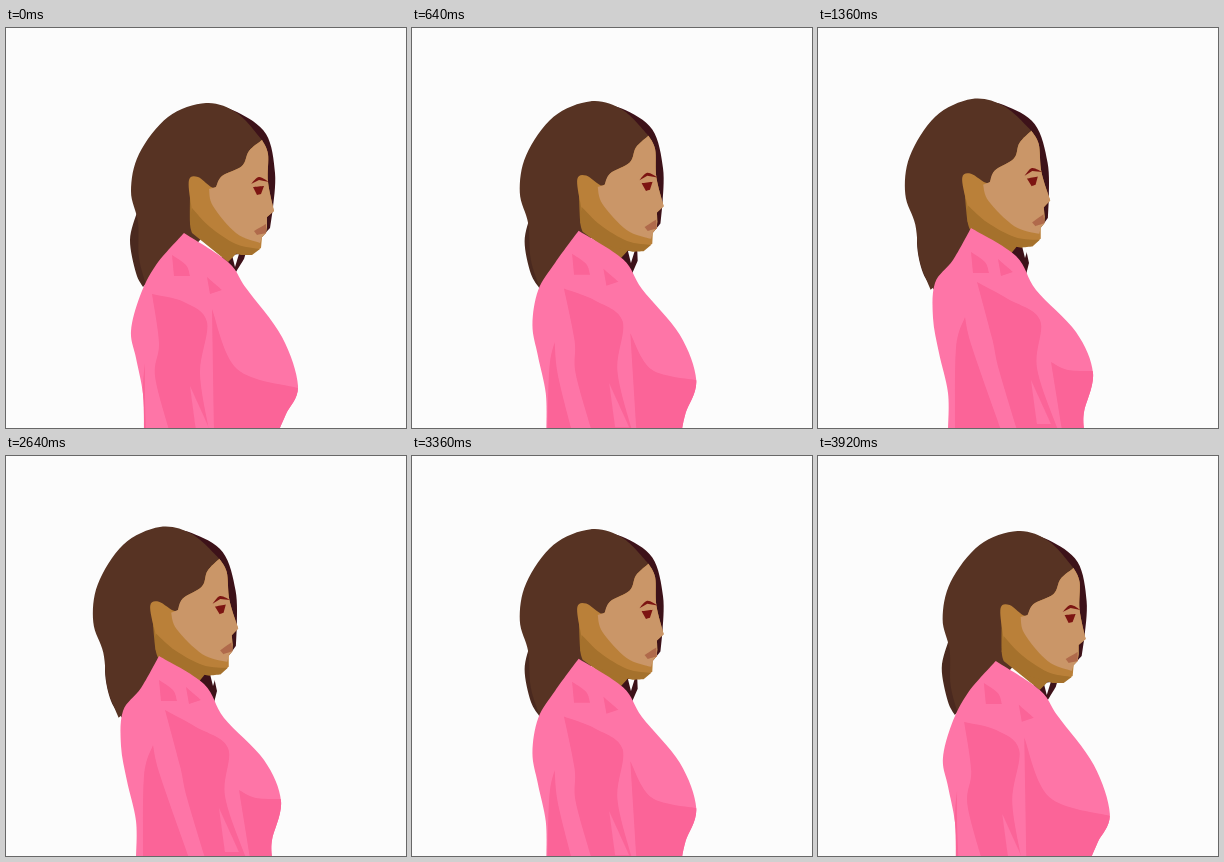
An HTML page with a canvas that plays this animation: 400x400 px, repeating every 5.92 s.

```html
<!DOCTYPE html>
<html>
<head>
<meta charset="utf-8">
<style>
html, body { margin: 0; width: 100%; height: 100%; overflow: hidden; background: #fcfcfc; }
canvas { display: block; width: 100vmin; height: 100vmin; }
</style>
</head>
<body>
<canvas width="400" height="400"></canvas>
<script>
const ctx = document.querySelector('canvas').getContext('2d');
const PAPER = '#fcfcfc', HAIR = '#573323', FAR = '#3d1219', BACK = '#4a291f';
const SKIN = '#ba8039', LIT = '#ca9668', SHADE = '#a5712c', RED = '#7c1512';
const PINK = '#fe75a7', FOLD = '#fb6498';
const LOOP = 5920, STEP = 80, TURN = 1360, BACK_AT = 2640;

// Runs of key points are split by "/": each run is a smooth curve, runs meet in corners.
const parse = s => s.split('/').map(run => run.trim().split(' ').map(p => p.split(',').map(Number)));

// A shape has two poses; the second is given by key points or by a rule for each point.
function shape(color, pose, next) {
  const a = parse(pose);
  const b = typeof next === 'string' ? parse(next) : a.map(run => run.map(next));
  return { color, at: u => outline(a.map((run, i) => run.map((p, j) =>
    p.map((v, k) => v + (b[i][j][k] - v) * u)))) };
}

function outline(runs) {
  const path = new Path2D();
  for (const run of runs) {
    path.lineTo(...run[0]);
    for (let i = 0; i < run.length - 1; i++) {
      const b = run[i], c = run[i + 1], a = run[i - 1] || b, d = run[i + 2] || c;
      const handle = (p, from, to, sign) => p.map((v, k) => v + sign * (to[k] - from[k]) / 6);
      path.bezierCurveTo(...handle(b, a, c, 1), ...handle(c, b, d, -1), ...c);
    }
  }
  path.closePath();
  return path;
}

const shift = (dx, dy) => ([x, y]) => [x + dx, y + dy];

// The head tips back around the ear
const tip = ([x, y]) => [x - 38 + 0.096 * (y - 160), y - 3 - 0.096 * (x - 190)];
const head = (color, pose) => shape(color, pose, tip);

const PROFILE = '256,112 262,126 262,154 268,183 / 261,189 261,198 / 260,205 256,209';

const figure = [
  head(FAR, '200,75 231,84 260,106 269,145 267,180 / 264,200 256,209 / 235,120'),
  shape(BACK, '131,184 124,212 130,245 137,259 / 165,230 150,190',
    '104,190 99,215 105,245 117,263 / 150,230 135,190'),
  shape(FAR, '218,222 241,221 / 238,231 230,244 / 216,230', '188,212 206,212 / 211,235 207,251 / 187,224'),
  shape(PAPER, '226,227 / 233,226 / 229,239', shift(-22, -9)),
  head(HAIR, '256,112 231,85 200,75 162,89 133,126 125,163 132,194 133,230 141,260 / 170,240 / 200,205 / 245,150'),
  // skin
  head(SHADE, '184,165 184,195 186,205 / 222,234 / 228,228 240,215'),
  head(SKIN, `${PROFILE} / 255,220 245,226 / 215,217 190,195 185,176 183,152 192,149 208,160 216,148 236,138 243,123 256,112`),
  head(SHADE, '186,180 204,199 230,216 254,221 / 246,227 235,227 / 210,220 184,196'),
  head(LIT, `${PROFILE} / 254,215 230,205 207,178 203,161 / 210,159 216,148 236,138 243,123 256,112`),
  // brow, eye, lips
  head(RED, '245,156 253,149 263,154 / 253,152'),
  head(RED, '247,159 258,158 / 255,166 251,167'),
  head('#b06a4b', '248,203 260,196 / 260,205 251,207')
];

const torso = shape(PINK,
  '178,205 150,237 134,268 125,303 130,330 137,366 138,402 / 273,402 280,386 292,358 276,309 240,260 222,234 178,205',
  '153,200 135,232 117,255 115,290 121,325 130,365 130,402 / 266,402 266,384 275,345 258,304 218,262 198,228 153,200');

const folds = [
  shape(FOLD, '166,227 168,248 / 184,248 180,237 166,227', shift(-13, -3)),
  shape(FOLD, '201,249 204,266 / 216,262 201,249', shift(-21, -18)),
  // sleeve
  shape(FOLD, '146,266 178,274 201,294 194,345 203,402 / 163,402 149,348 153,315 146,266',
    '159,254 190,271 222,292 219,340 240,402 / 199,402 181,342 174,310 159,254'),
  shape(FOLD, '139,335 139,370 140,402 / 134,402 137,355 139,335',
    '147,289 154,319 183,402 / 137,402 138,320 147,289'),
  shape(PINK, '184,358 204,402 / 190,402 184,358', shift(29, -6)),
  // under the bust
  shape(FOLD, '206,281 231,341 292,360 / 300,402 / 208,402 206,281',
    '233,334 250,342 277,343 / 285,402 / 244,402 233,334')
];

const ease = x => {
  x = Math.min(1, Math.max(0, x));
  return x * x * (3 - 2 * x);
};

function draw(now) {
  const t = Math.floor(now % LOOP / STEP) * STEP;
  const u = ease(t / TURN) - ease((t - BACK_AT) / TURN);
  const fill = s => {
    ctx.fillStyle = s.color;
    ctx.fill(s.at(u));
  };

  ctx.fillStyle = PAPER;
  ctx.fillRect(0, 0, 400, 400);
  figure.forEach(fill);
  fill(torso);
  ctx.save();
  ctx.clip(torso.at(u));
  folds.forEach(fill);
  ctx.restore();
}

const start = performance.now();
function tick() {
  draw(performance.now() - start);
  requestAnimationFrame(tick);
}
tick();
</script>
</body>
</html>
```
